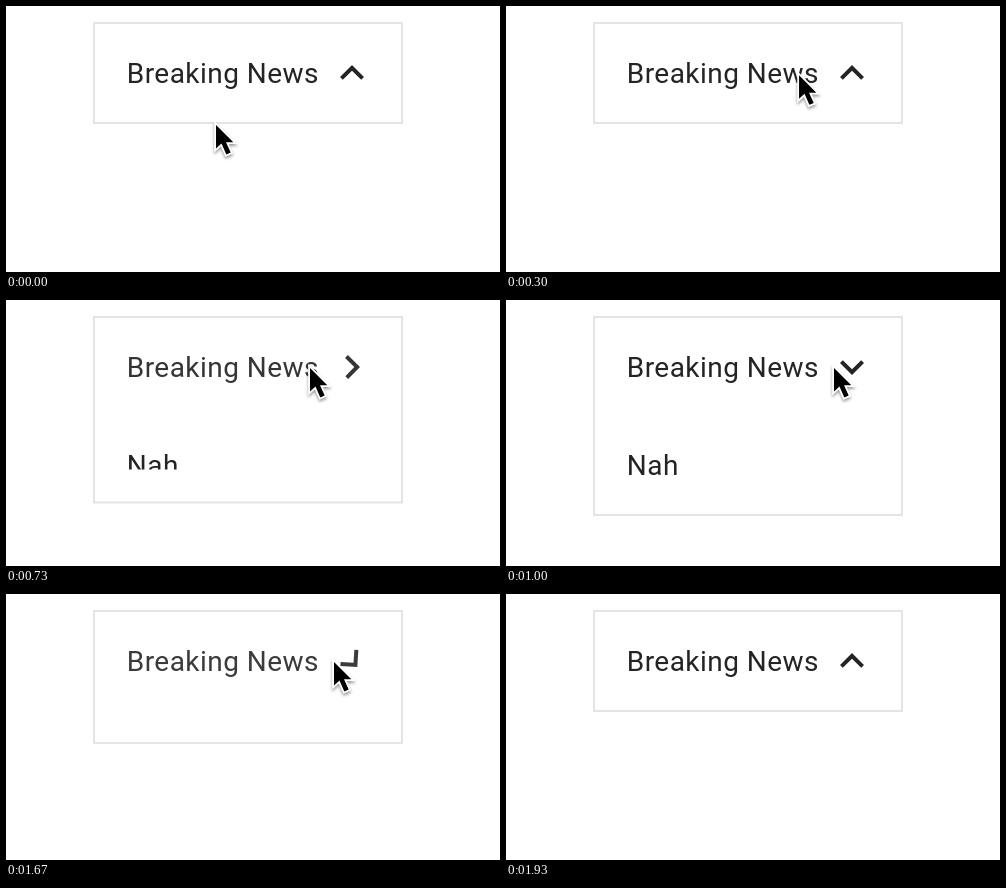
An HTML page for the animation above (2.76 s loop, 494 px wide and 266 px high).

```html
<!DOCTYPE html>
<html lang="en">
<head>
<meta charset="utf-8">
<title>Accordion toggle</title>
<style>
  html, body { margin: 0; width: 100%; height: 100%; overflow: hidden; background: #fff; }
  svg { display: block; width: 494px; height: 266px; }
  text { font: 28px Roboto, Inter, sans-serif; letter-spacing: .45px; }
  #cursor { filter: drop-shadow(0 2px 1.5px rgba(0, 0, 0, .4)); }
</style>
</head>
<body>
<svg viewBox="0 0 494 266" fill="#242424">
  <clipPath id="clip"><rect id="content" x="88" y="17" width="308"/></clipPath>
  <rect id="box" x="88" y="17" width="308" fill="none" stroke="#e4e4e4" stroke-width="2"/>
  <g id="header">
    <text x="120.8" y="77">Breaking News</text>
    <path id="chevron" d="M0-8L-12 4l2.8 2.8L0-2.3 9.2 6.8 12 4z"/>
  </g>
  <g clip-path="url(#clip)"><text x="120.8" y="175">Nah</text></g>
  <circle id="ring" r="42.5" fill="none" stroke="#000" stroke-width="3"/>
  <path id="cursor" d="M1 3V26.5L6.5 21.5 11.3 32.5 15.7 30.6 11 20.3H18.3z"
        fill="#000" stroke="#fff" stroke-width="3.6" paint-order="stroke"/>
</svg>
<script>
const LOOP = 2760, TOGGLE = 324;
const OPEN = { press: 430, release: 570 }, CLOSE = { press: 1370, release: 1570 };
const $ = id => document.getElementById(id);
const progress = (t, start, length) => Math.min(1, Math.max(0, (t - start) / length));
const easeOut = p => 1 - (1 - p) ** 3;
const easeInOut = p => p * p * (3 - 2 * p);
const mix = (a, b, p) => a + (b - a) * p;

function cursorAt(t) {
  if (t < 430) {
    const p = progress(t, 30, 400);
    return [mix(209, 303, 1 - (1 - p) ** 1.9), mix(116, 65, 1 - (1 - p) ** 3.2)];
  }
  const leave = progress(t, 1780, 120);
  const x = mix(303, 327, easeInOut(progress(t, 730, 270)));
  return [x - 219 * leave ** 2, 65 + 40 * leave ** 3.6];
}

function draw(t) {
  const opening = progress(t, OPEN.release, TOGGLE);
  const closing = progress(t, CLOSE.release, TOGGLE);
  const open = easeOut(opening) - easeOut(closing);
  const turn = 180 * (easeInOut(opening) - easeInOut(closing));
  $("box").setAttribute("height", 100 + 98 * open);
  $("content").setAttribute("height", 67 + 98 * open);
  $("chevron").setAttribute("transform", `translate(346 67) rotate(${turn})`);

  const click = t < 1200 ? OPEN : CLOSE;
  const pressed = t >= click.press && t < click.release;
  const released = t >= click.release;
  const fade = released ? .16 * (1 - progress(t, click.release, TOGGLE)) : pressed ? .04 : 0;
  $("header").setAttribute("opacity", 1 - fade);

  const [x, y] = cursorAt(t);
  $("cursor").setAttribute("transform", `translate(${x} ${y})`);
  $("cursor").setAttribute("visibility", t < 1930 ? "visible" : "hidden");
  $("ring").setAttribute("transform", `translate(${x} ${y + 2})`);
  $("ring").setAttribute("visibility", pressed ? "visible" : "hidden");
}

const start = performance.now();
function frame() {
  draw((performance.now() - start) % LOOP);
  requestAnimationFrame(frame);
}
frame();
</script>
</body>
</html>
```
